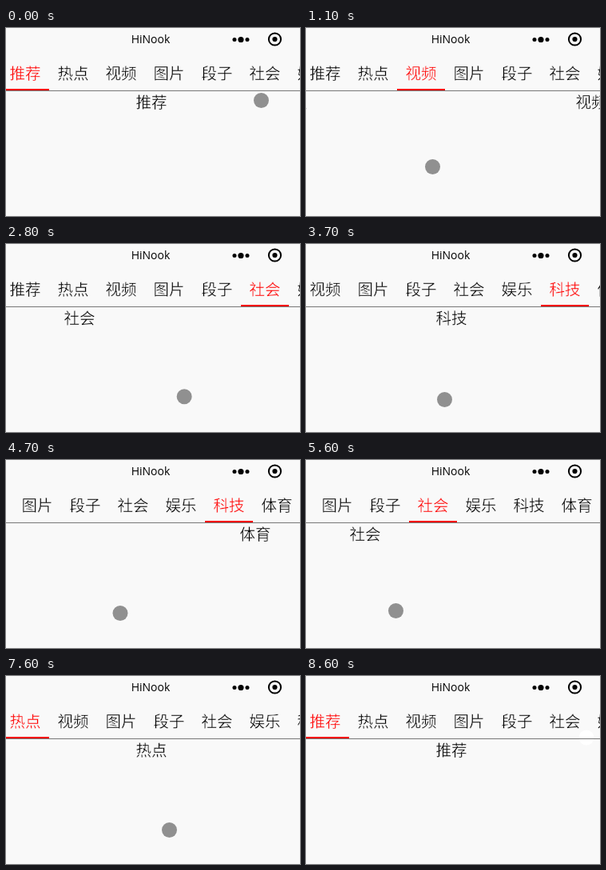
Write an HTML page that moves like this. It is 368 px wide and 235 px high and loops after 9.3 s.

```html
<!DOCTYPE html>
<html lang="zh-CN">
<head>
<meta charset="utf-8">
<title>Swipe tabs</title>
<style>
  html, body { margin: 0; width: 100%; height: 100%; overflow: hidden; background: #f9f9f9; }
  svg { display: block; width: 368px; height: 235px; }
  text { text-anchor: middle; fill: #000; }
  .title { font: 14px "Open Sans", "Noto Sans", sans-serif; }
  /* The background-coloured outline thins the strokes */
  .cjk text {
    font: 300 19.5px "Noto Sans CJK SC", "Noto Sans CJK", sans-serif;
    stroke: #f9f9f9;
    stroke-width: 0.4px;
  }
  .cjk text.on { fill: #f00; }
</style>
</head>
<body>
<svg viewBox="0 0 368 235">
  <rect width="368" height="235" fill="#f9f9f9"/>
  <text class="title" x="181" y="19">HiNook</text>
  <circle cx="286" cy="14.5" r="2.5"/>
  <circle cx="294" cy="14.5" r="3.6"/>
  <circle cx="302" cy="14.5" r="2.5"/>
  <circle cx="336.5" cy="14" r="7.6" fill="none" stroke="#000" stroke-width="2"/>
  <circle cx="336.5" cy="14" r="3.1"/>
  <g id="tabs" class="cjk"></g>
  <g id="pages" class="cjk"></g>
  <circle id="cursor" r="9.5"/>
  <rect y="78" width="368" height="1" fill="#777"/>
</svg>
<script>
  const LOOP = 9300, STEP = 100, LAST = 8600;
  const TAB = 60, PAGE = 375, LEFT = -6, MAX_SCROLL = 165;
  const DRAG = 150, GLIDE = 300, RETURN = 140, DRAGGED = 0.3, REACH = 80;
  const names = ['推荐', '热点', '视频', '图片', '段子', '社会', '娱乐', '科技', '体育'];

  // Runs of evenly spaced swipes
  const runs = [
    { dir: 1, count: 7, first: 620, gap: 442 },
    { dir: 1, count: 1, first: 3990, gap: 0 },
    { dir: -1, count: 6, first: 4693, gap: 415 },
    { dir: -1, count: 2, first: 7330, gap: 562 }
  ];
  const swipes = runs.flatMap(({ dir, count, first, gap }) =>
    Array.from({ length: count }, (_, i) => ({ dir, time: first + gap * i })));

  // Where the finger lifts: swipe number, x, y
  const lifts = [[1, 158.5, 173.5], [3, 274.5, 183.5], [6, 173.5, 194.5],
                 [10, 112.5, 188.5], [13, 204.5, 192.5]];

  // Linear position along points of [key, x, y]
  function along(points, key) {
    const k = points.findIndex(p => p[0] > key);
    if (k === 0) return points[0].slice(1);
    if (k < 0) return points[points.length - 1].slice(1);
    const [k0, x0, y0] = points[k - 1], [k1, x1, y1] = points[k];
    const s = (key - k0) / (k1 - k0);
    return [x0 + (x1 - x0) * s, y0 + (y1 - y0) * s];
  }

  // Drag, rest after lifting, then return for the next drag
  const path = [[0, 319.5, 90.5]];
  swipes.forEach(({ dir, time }, k) => {
    const [x, y] = along(lifts, k);
    path.push([time - DRAG, x + dir * REACH, y], [time, x, y]);
    const next = swipes[k + 1];
    if (next) path.push([next.time - DRAG - RETURN, x, y]);
  });
  path.push([LAST, 351, 77]);

  const $ = id => document.getElementById(id);
  function set(el, attrs) {
    for (const key in attrs) el.setAttribute(key, attrs[key]);
    return el;
  }
  function add(parent, tag, attrs, text = '') {
    const el = set(document.createElementNS('http://www.w3.org/2000/svg', tag), attrs);
    el.textContent = text;
    return parent.appendChild(el);
  }

  const tabs = $('tabs'), pages = $('pages'), cursor = $('cursor');
  const labels = names.map((name, i) =>
    add(tabs, 'text', { x: LEFT + TAB * (i + 0.5), y: 64 }, name));
  const bar = add(tabs, 'rect', { y: 76, width: TAB, height: 2, fill: '#f00' });
  names.forEach((name, i) => add(pages, 'text', { x: 182 + PAGE * i, y: 100 }, name));

  // Share of a page turned, u ms after the finger lifts
  function progress(u) {
    if (u < 0) return DRAGGED * Math.max(0, 1 + u / DRAG);
    const rest = 1 - Math.min(1, u / GLIDE);
    return 1 - (1 - DRAGGED) * rest ** 3;
  }

  // Keep the active tab inside the visible strip
  function reveal(scroll, i) {
    const low = TAB * (i - 5), high = TAB * i;
    return Math.min(MAX_SCROLL, high, Math.max(low, scroll));
  }

  function draw(t) {
    let page = 0, active = 0, scroll = 0;
    for (const { dir, time } of swipes) {
      page += dir * progress(t - time);
      if (t >= time) {
        active += dir;
        scroll = reveal(scroll, active);
      }
    }
    labels.forEach((el, i) => el.classList.toggle('on', i === active));
    set(bar, { x: LEFT + TAB * active });
    set(tabs, { transform: `translate(${-scroll} 0)` });
    set(pages, { transform: `translate(${-Math.round(page * PAGE)} 0)` });

    const [cx, cy] = along(path, t);
    set(cursor, { cx, cy, fill: t < LAST ? '#909090' : '#fff' });
  }

  const start = performance.now();
  function tick() {
    const t = (performance.now() - start) % LOOP;
    draw(Math.min(LAST, Math.floor(t / STEP) * STEP));
    requestAnimationFrame(tick);
  }
  tick();
</script>
</body>
</html>
```
